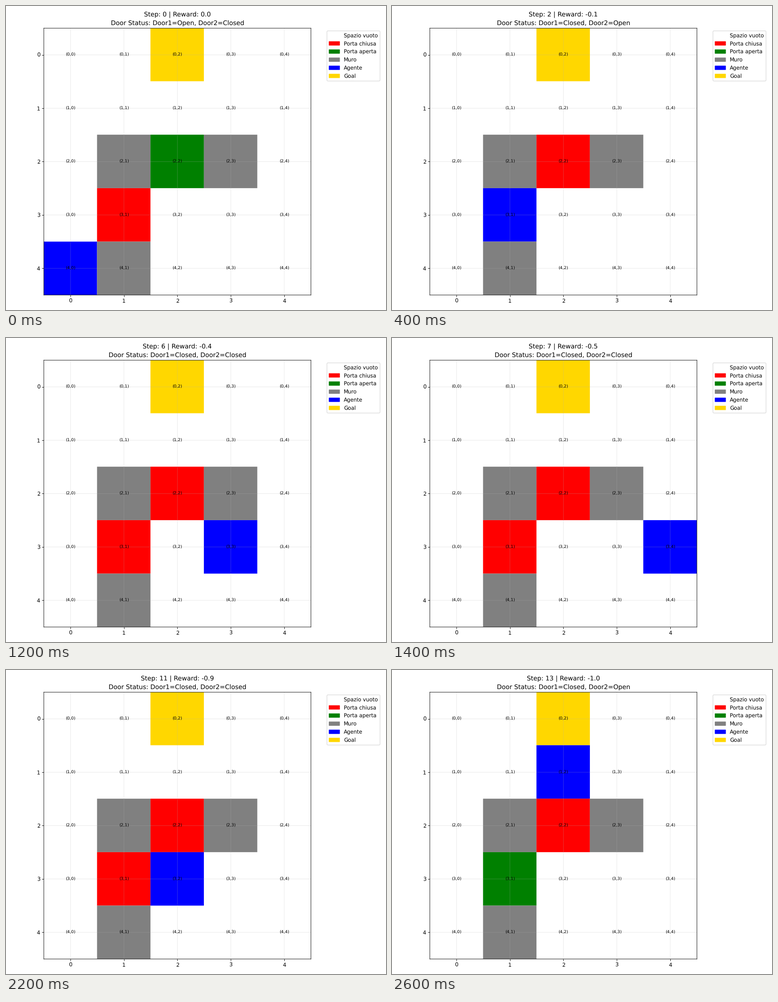
Write a matplotlib script that moves like this. It is 837 px wide and 669 px high and loops after 2.8 s.

```python
import matplotlib.pyplot as plt
from matplotlib.animation import FuncAnimation
from matplotlib.patches import Patch, Rectangle

# Soft, unsnapped edges and letters
plt.rcParams.update({"path.snap": False, "text.hinting": "none"})

W, H, DPI = 837, 669, 83.65
EPS = 0.01  # keeps the pixel size from truncating downwards
N = 5
LEFT, TOP, WIDTH, HEIGHT = 83.28, 48.9, 588.4, 587.1  # axes box in pixels
CELL_LEFT, CELL_TOP, CELL = 82.9, 47.9, 117.65

EMPTY, CLOSED, OPEN, WALL, AGENT, GOAL = "none", "red", "green", "gray", "blue", "gold"
LEGEND = [
    ("Spazio vuoto", EMPTY),
    ("Porta chiusa", CLOSED),
    ("Porta aperta", OPEN),
    ("Muro", WALL),
    ("Agente", AGENT),
    ("Goal", GOAL),
]

WALLS = [(2, 1), (2, 3), (4, 1)]
DOORS = [(2, 2), (3, 1)]
GOAL_CELL = (0, 2)

# Agent cell and door states (1 = open) at each step
PATH = [(4, 0), (3, 0), (3, 1), (3, 2), (3, 2), (3, 3), (3, 3),
        (3, 4), (3, 4), (3, 3), (3, 2), (3, 2), (2, 2), (1, 2)]
STATES = [(1, 0)] * 2 + [(0, 1)] * 2 + [(1, 0)] * 2 + [(0, 0)] * 6 + [(1, 0), (0, 1)]


def reward(step):
    """Every step costs 0.1, except those that swap both doors."""
    swaps = sum(
        a[0] != b[0] and a[1] != b[1]
        for a, b in zip(STATES[:step], STATES[1:step + 1])
    )
    return (swaps - step) / 10


def cell_colors(step):
    colors = {cell: WALL for cell in WALLS}
    colors[GOAL_CELL] = GOAL
    for cell, is_open in zip(DOORS, STATES[step]):
        colors[cell] = OPEN if is_open else CLOSED
    colors[PATH[step]] = AGENT
    return colors


fig = plt.figure(figsize=((W + EPS) / DPI, (H + EPS) / DPI), dpi=DPI, facecolor="white")
ax = fig.add_axes([LEFT / W, 1 - (TOP + HEIGHT) / H, WIDTH / W, HEIGHT / H])
ax.set_xlim(-0.5, N - 0.5)
ax.set_ylim(N - 0.5, -0.5)
ax.set_xticks(range(N))
ax.set_yticks(range(N))
ax.grid(True, alpha=0.3)

cells = {}
for row in range(N):
    for col in range(N):
        corner = (CELL_LEFT + CELL * col, H - CELL_TOP - CELL * (row + 1))
        rect = Rectangle(corner, CELL, CELL, linewidth=0, zorder=0, transform=None)
        cells[row, col] = ax.add_patch(rect)
        rect.set_clip_path(ax.patch)
        ax.text(col, row, f"({row},{col})", ha="center", va="center", fontsize=8)

ax.legend(
    handles=[Patch(color=color, label=label) for label, color in LEGEND],
    loc="upper left",
    bbox_to_anchor=(1.05, 1),
    labelspacing=0.54,
)
title = ax.set_title("", linespacing=1.37)


def update(step):
    colors = cell_colors(step)
    for cell, rect in cells.items():
        rect.set_facecolor(colors.get(cell, EMPTY))
    door1, door2 = ("Open" if s else "Closed" for s in STATES[step])
    title.set_text(
        f"Step: {step} | Reward: {reward(step):.1f}\n"
        f"Door Status: Door1={door1}, Door2={door2}"
    )
    return [title, *cells.values()]


anim = FuncAnimation(fig, update, frames=len(PATH), interval=200, repeat=True, blit=False)
plt.show()
```
